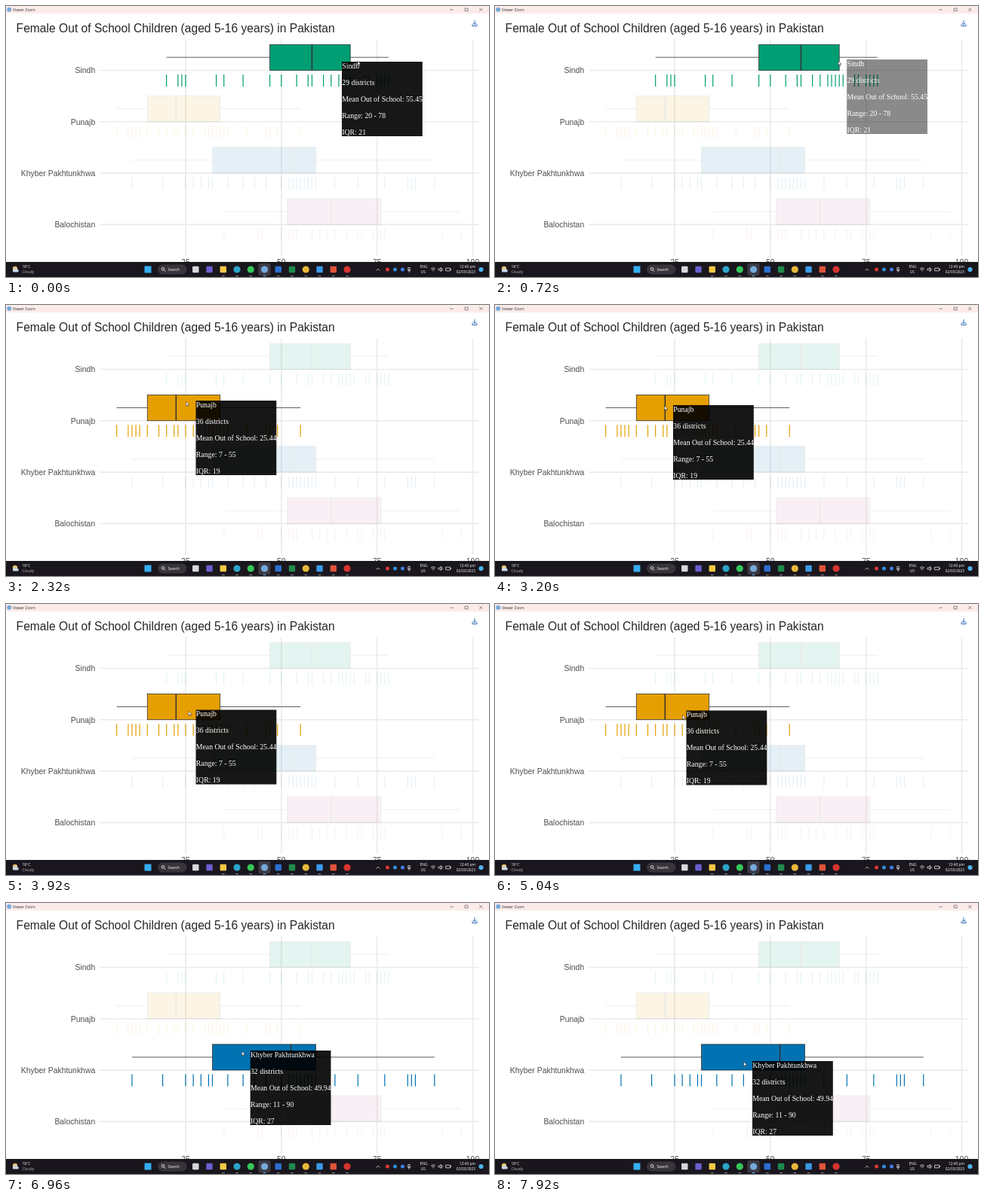
Recreate the animation shown at these times as an HTML page. Size 640 px wide and 360 px high, loop 8 s.

```html
<!DOCTYPE html>
<html lang="en">
<head>
<meta charset="utf-8">
<title>Out of school children</title>
<style>
html, body { margin: 0; width: 100%; height: 100%; overflow: hidden; background: #fff; }
svg { display: block; width: 640px; height: 360px; }
text { white-space: pre; }
.title, .label { font-family: "Liberation Sans", Arial, sans-serif; }
.title { font-size: 15.63px; fill: #262626; }
.label { font-size: 10.42px; fill: #4d4d4d; text-anchor: end; }
.axis { text-anchor: middle; }
.ui { font-family: "Open Sans", sans-serif; font-size: 4.9px; fill: #fff; }
.end { text-anchor: end; }
#tip text { font-family: "Liberation Serif", "Times New Roman", serif; font-size: 9.78px; fill: #fff; }
.grid { stroke: #ebebeb; stroke-width: 1.6; }
.line { fill: none; stroke-linecap: round; stroke-linejoin: round; }
</style>
</head>
<body>
<svg id="stage" viewBox="0 0 640 360">
  <rect width="640" height="360" fill="#fff"/>
  <g id="chart"></g>
  <text class="title" x="13.6" y="34.5">Female Out of School Children (aged 5-16 years) in Pakistan</text>
  <path class="line" d="M621 19.5v5M619 22.8l2 2 2-2M618 24.5v2h6v-2" stroke="#2b6cb0" stroke-width="1"/>

  <g id="titlebar">
    <rect width="640" height="10" fill="#fbecea"/>
    <circle cx="4.2" cy="4.8" r="3" fill="#75aadb"/>
    <text class="ui" x="9" y="6.7" style="fill:#333">Viewer Zoom</text>
    <path class="line" d="M588.5 5h4M608.5 3h3.6v3.6h-3.6zM627.5 3l3.6 3.6M631.1 3l-3.6 3.6" stroke="#444" stroke-width=".6"/>
  </g>

  <g id="taskbar">
    <rect y="340" width="640" height="20" fill="#1a161d"/>
    <circle cx="12" cy="349" r="3.2" fill="#e9c46a"/>
    <path d="M10 353.5a2 2 0 0 1 .4-3.8 2.6 2.6 0 0 1 4.8.3 1.8 1.8 0 0 1 .4 3.5z" fill="#c9d6e6"/>
    <text class="ui" x="21.5" y="348.4">18°C</text>
    <text class="ui" x="21.5" y="355.4" style="fill:#bbb">Cloudy</text>
    <rect x="183.5" y="345.5" width="9" height="9" fill="#35aef0"/>
    <rect x="201" y="343.5" width="38.5" height="13" rx="6.5" fill="#38343c"/>
    <circle cx="208" cy="349.3" r="1.8" fill="none" stroke="#fff" stroke-width=".8"/>
    <path d="M209.3 350.7l1.8 1.9" stroke="#fff" stroke-width=".8"/>
    <text class="ui" x="214.5" y="352">Search</text>
    <rect x="334.5" y="342" width="16" height="16" rx="2" fill="#3d3a44"/>
    <g id="icons"></g>
    <g class="line" stroke="#fff" stroke-width=".7">
      <path d="M491 351.2l2-2 2 2"/>
      <path d="M533.2 347.5h2v3h-2zM532.2 351q2 2.4 4 0M534.2 352.2v1.3"/>
      <path d="M563.3 348.8q2.7-2.6 5.4 0M564.4 350.4q1.6-1.5 3.2 0M566 352v.2"/>
      <path d="M573.5 349h1.2l1.8-1.6v5.2l-1.8-1.6h-1.2zM578 348.6q1 1.4 0 2.8"/>
      <path d="M583 348.2h5.6v3.6H583zM589.6 349.4v1.2"/>
    </g>
    <text class="ui end" x="558.5" y="348.4">ENG</text>
    <text class="ui end" x="556" y="355.4">US</text>
    <text class="ui end" x="622" y="348.4">12:40 pm</text>
    <text class="ui end" x="622" y="355.4" style="font-size:4.75px">02/03/2023</text>
    <circle cx="629.5" cy="350" r="3.1" fill="#4cb4ee"/>
  </g>

  <g id="tip">
    <rect width="106.8" height="99" fill="#000" fill-opacity=".91"/>
  </g>
  <path id="cursor" d="M0 0v5.6l1.3-1.2 1 2.1 1-.4-1-2.1h1.8z" fill="#fff" stroke="#222" stroke-width=".5"/>
</svg>
<script>
const NS = "http://www.w3.org/2000/svg";
const $ = id => document.getElementById(id);
function add(parent, tag, attrs, text) {
  const el = document.createElementNS(NS, tag);
  for (const k in attrs) el.setAttribute(k, attrs[k]);
  if (text !== undefined) el.textContent = text;
  return parent.appendChild(el);
}

const LOOP = 8000, STEP = 80, ROW = 68.3;
const FADE_IN = 160, FADE_OUT = 340;
const sx = v => 111.2 + 5.073 * v;

// five: min, lower quartile, median, upper quartile, max
const regions = [
  { name: "Sindh", color: "#009e73", five: [20, 47, 58, 68, 78], count: 29, mean: "55.45", iqr: 21,
    ticks: [20, 23, 24, 25, 33, 35, 40, 47, 50, 54, 57, 58, 61, 63, 65, 66, 67, 68, 69, 72, 73, 75, 76, 77, 78] },
  { name: "Punajb", color: "#e69f00", five: [7, 15, 22.5, 34, 55], count: 36, mean: "25.44", iqr: 19,
    ticks: [7, 10, 11, 12, 13, 15, 18, 20, 22, 23, 25, 27, 30, 31, 32, 33, 34, 35, 36, 41, 46, 47, 49, 55] },
  { name: "Khyber Pakhtunkhwa", color: "#0072b2", five: [11, 32, 52.5, 59, 90], count: 32, mean: "49.94", iqr: 27,
    ticks: [11, 19, 25, 27, 29, 31, 32, 36, 40, 43, 46, 50, 52, 53, 54, 55, 56, 57, 58, 59, 64, 70, 77, 83, 84, 85, 90] },
  { name: "Balochistan", color: "#cc79a7", five: [35, 51.5, 63, 76, 97],
    ticks: [35, 44, 45, 50, 52, 53, 54, 58, 60, 62, 64, 67, 70, 71, 74, 76, 77, 92, 97] }
];

const chart = $("chart");
for (const v of [25, 50, 75, 100]) {
  add(chart, "path", { class: "grid", d: `M${sx(v)} 44V332` });
  add(chart, "text", { class: "label axis", x: sx(v), y: 343.6 }, v);
}
regions.forEach((r, i) => {
  const y = 85.5 + i * ROW;
  add(chart, "path", { class: "grid", d: `M124 ${y}H627` });
  add(chart, "text", { class: "label", x: 118.2, y: y + 3.8 }, r.name);
});
regions.forEach((r, i) => {
  const top = 51.2 + i * ROW, mid = top + 17, bottom = top + 34.2;
  const [lo, q1, med, q3, hi] = r.five.map(sx);
  r.box = [q1 + 1.5, top, q3 - 1.5, bottom];
  r.g = add(chart, "g", {});
  add(r.g, "path", { d: `M${lo} ${mid}H${q1}M${q3} ${mid}H${hi}`, stroke: "#333", "stroke-width": .8 });
  add(r.g, "rect", { x: q1, y: top, width: q3 - q1, height: bottom - top, fill: r.color, stroke: "#333", "stroke-width": .8 });
  add(r.g, "path", { d: `M${med} ${top}V${bottom}`, stroke: "#333", "stroke-width": 1.5 });
  add(r.g, "path", { d: r.ticks.map(v => `M${sx(v)} ${top + 39.8}v16`).join(""), stroke: r.color, "stroke-width": 1.2 });
});

// taskbar marks: s = square, c = circle
const icons = $("icons");
"s#d8d8dc s#6a5fd0 s#f6c945 c#2aa5c9 c#35c759 c#75aadb s#2b6fd0 s#1f8a4c c#e8b83a s#3a9be8 s#e0533a c#d8342f"
  .split(" ").forEach((mark, i) => {
    const x = 251.3 + i * 18.25, fill = mark.slice(1);
    if (mark[0] === "c") add(icons, "circle", { cx: x, cy: 350, r: 4.6, fill });
    else add(icons, "rect", { x: x - 4.2, y: 345.8, width: 8.4, height: 8.4, rx: 1, fill });
    if (i > 1) add(icons, "rect", { x: x - 2, y: 358, width: 4, height: .9, rx: .4, fill: i === 5 ? "#5ab4f0" : "#8a868e" });
  });
[[505.5, "#d93a32"], [515.5, "#2f8fe0"], [525.5, "#3f7fe8"]].forEach(([cx, fill]) =>
  add(icons, "circle", { cx, cy: 350, r: 2.5, fill }));

const tip = $("tip"), cursor = $("cursor");
const lines = [0, 1, 2, 3, 4].map(i => add(tip, "text", { x: .3, y: 8.8 + 22 * i }));

// pointer path: time, x, y
const path = [
  [-80, 433.5, 75], [0, 466, 73], [320, 488, 71], [560, 478, 71], [720, 455, 73],
  [1200, 351, 74], [1280, 336, 74], [1520, 298, 92], [1840, 250, 122], [2080, 240, 128],
  [2240, 240, 128], [3120, 224.5, 134], [3200, 224.5, 134], [3920, 242, 142.5],
  [4960, 242, 142.5], [5040, 248.5, 147.5], [5120, 251, 153], [5440, 296.5, 190.5],
  [5760, 306, 194], [6160, 311.5, 197], [6720, 311.5, 197], [6960, 312.5, 197],
  [7840, 329.5, 211], [8000, 329.5, 211]
];
// hover spans: from, to, region
const hovers = [[-500, 80, 0], [720, 1280, 0], [1840, 5120, 1], [5520, 8500, 2]];

function at(t) {
  let i = 1;
  while (i < path.length - 1 && t > path[i][0]) i++;
  const [t0, x0, y0] = path[i - 1], [t1, x1, y1] = path[i];
  const k = Math.min(1, Math.max(0, (t - t0) / (t1 - t0)));
  return [x0 + (x1 - x0) * k, y0 + (y1 - y0) * k];
}
const clamp = (v, a, b) => Math.min(b, Math.max(a, v));
const move = (el, x, y) => el.setAttribute("transform", `translate(${x} ${y})`);

function draw(t) {
  move(cursor, ...at(t));
  const active = hovers.find(([a, b]) => t >= a && t < b);
  regions.forEach((r, i) => r.g.setAttribute("opacity", !active || active[2] === i ? 1 : .1));

  const span = hovers.find(([a, b]) => t >= a && t < b + FADE_OUT);
  tip.setAttribute("visibility", span ? "visible" : "hidden");
  if (!span) return;
  const [from, to, id] = span, r = regions[id];
  const [l, top, right, bottom] = r.box;
  // the tooltip trails the pointer by one step and stays on the box
  const [x, y] = at(Math.min(t - STEP, to));
  move(tip, clamp(x, l, right) + 11.5, clamp(y, top, bottom) - 1);
  tip.setAttribute("opacity", t < to ? Math.min(1, (t - from + STEP) / FADE_IN) : 1 - (t - to) / FADE_OUT);
  [r.name, `${r.count} districts`, `Mean Out of School: ${r.mean}`,
    `Range: ${r.five[0]} - ${r.five[4]}`, `IQR: ${r.iqr}`].forEach((s, i) => lines[i].textContent = s);
}

const start = performance.now();
function tick(now) {
  const t = Math.max(0, now - start) % LOOP;
  draw(Math.floor(t / STEP) * STEP);
  requestAnimationFrame(tick);
}
draw(0);
requestAnimationFrame(tick);
</script>
</body>
</html>
```
